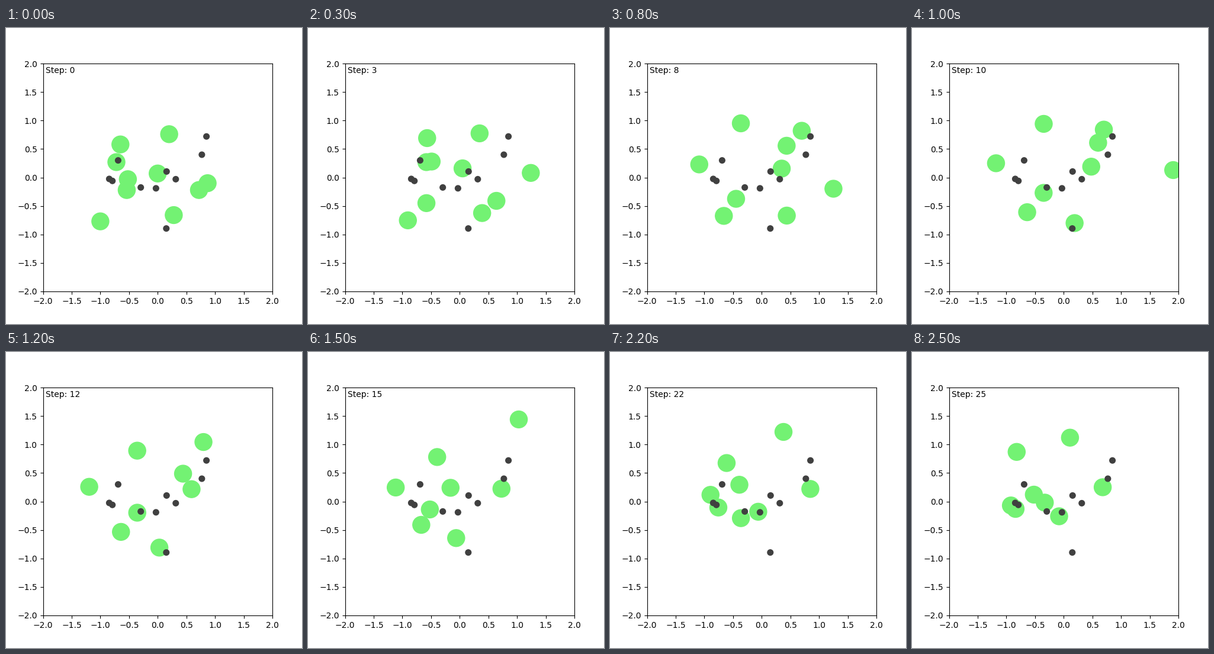
A matplotlib script for the animation above (2.6 s loop, 500 px wide and 500 px high).

```python
import matplotlib.pyplot as plt
import numpy as np
from matplotlib.animation import FuncAnimation
from matplotlib.patches import Circle

STEPS = 26
INTERVAL = 100
AGENT_RADIUS, LANDMARK_RADIUS = 0.15, 0.05
AGENT_COLOR, LANDMARK_COLOR = (0.45, 0.95, 0.45), (0.25, 0.25, 0.25)
KEEP = 0.75  # share of velocity kept per step
BOUNCE = 1.0  # velocity gained per unit of overlap

# Positions are complex numbers x + yj. Each route maps a step to a key point;
# damped motion and collisions fill in the rest.
ROUTES = [
    {0: -0.65 + 0.58j, 6: -0.42 + 0.89j, 19: -0.46 + 0.60j, 25: -0.82 + 0.87j},
    {0: 0.20 + 0.76j, 6: 0.61 + 0.80j, 10: 0.70 + 0.84j, 15: 1.03 + 1.44j,
     19: 0.72 + 1.38j, 25: 0.11 + 1.12j},
    {0: -0.72 + 0.27j, 3: -0.58 + 0.27j, 10: -1.18 + 0.25j, 19: -0.93 + 0.21j,
     25: -0.92 - 0.07j},
    {0: -0.52 - 0.03j, 3: -0.49 + 0.28j, 6: 0.17 + 0.45j, 10: 0.60 + 0.61j,
     15: -0.16 + 0.24j, 19: -0.36 + 0.33j, 25: -0.52 + 0.12j},
    {0: -0.54 - 0.22j, 3: -0.58 - 0.45j, 10: -0.35 - 0.27j, 15: -0.52 - 0.14j,
     25: -0.84 - 0.13j},
    {0: 0.07j, 3: 0.05 + 0.16j, 10: 0.48 + 0.19j, 19: 0.89 + 0.21j, 25: 0.68 + 0.25j},
    {0: 0.72 - 0.22j, 3: 0.64 - 0.41j, 6: 0.76 - 0.44j, 10: 1.91 + 0.13j},
    {0: 0.87 - 0.10j, 3: 1.24 + 0.08j, 6: 1.89 + 0.28j},
    {0: -1.00 - 0.77j, 6: -0.73 - 0.72j, 15: -0.67 - 0.41j, 19: -0.48 - 0.43j,
     25: -0.33 - 0.02j},
    {0: 0.28 - 0.66j, 6: 0.59 - 0.56j, 10: 0.19 - 0.80j, 19: -0.06 - 0.27j,
     25: -0.08 - 0.26j},
]
LANDMARKS = [-0.845 - 0.025j, -0.79 - 0.06j, -0.69 + 0.30j, -0.295 - 0.175j, -0.03 - 0.19j,
             0.155 + 0.105j, 0.315 - 0.03j, 0.77 + 0.40j, 0.85 + 0.72j, 0.15 - 0.895j]


def contact(pos):
    """Velocity each agent gains from the agents it overlaps."""
    delta = pos[:, None] - pos
    dist = np.abs(delta) + 1e-9
    overlap = np.maximum(2 * AGENT_RADIUS - dist, 0)
    return BOUNCE * (delta / dist * overlap).sum(axis=1)


def push(route, step, pos, vel):
    """Constant push that takes an agent to its next key point on time."""
    ahead = [key for key in route if key > step]
    if not ahead:
        return 0
    reach = np.cumsum(KEEP ** np.arange(ahead[0] - step))
    return (route[ahead[0]] - pos - vel * reach[-1]) / reach.sum()


def simulate():
    pos = np.array([route[0] for route in ROUTES])
    vel = np.zeros_like(pos)
    track = [pos]
    for step in range(STEPS - 1):
        vel = KEEP * vel + contact(pos)
        vel = vel + [push(route, step, p, v) for route, p, v in zip(ROUTES, pos, vel)]
        pos = pos + vel
        track.append(pos)
    return track


track = simulate()

fig, ax = plt.subplots(figsize=(5, 5), dpi=100)
ax.set(xlim=(-2, 2), ylim=(-2, 2))


def add_circle(point, radius, color):
    return ax.add_patch(Circle((point.real, point.imag), radius, color=color))


agents = [add_circle(point, AGENT_RADIUS, AGENT_COLOR) for point in track[0]]
for point in LANDMARKS:
    add_circle(point, LANDMARK_RADIUS, LANDMARK_COLOR)
label = ax.text(-1.95, 1.95, "Step: 0", va="top")


def update(step):
    for agent, point in zip(agents, track[step]):
        agent.center = point.real, point.imag
    label.set_text(f"Step: {step}")
    return [*agents, label]


anim = FuncAnimation(fig, update, frames=STEPS, interval=INTERVAL, repeat=True, repeat_delay=0)
plt.show()
```
